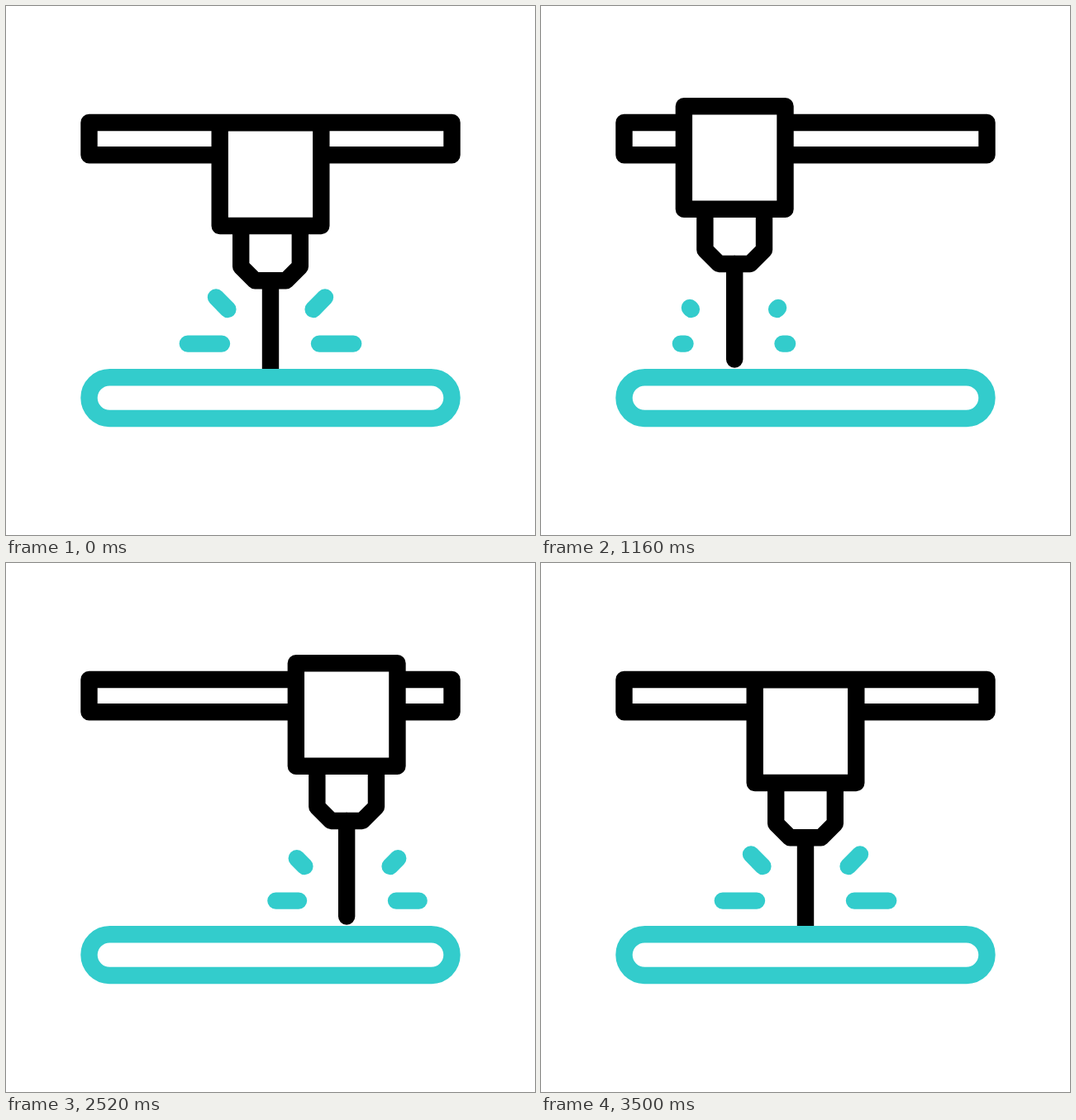
Write an HTML page that moves like this. It is 640 by 640 pixels and loops after 3600 ms.

```html
<!DOCTYPE html>
<html lang="en">
<head>
<meta charset="utf-8">
<title>Drilling machine</title>
<style>
  html, body { margin: 0; width: 100%; height: 100%; overflow: hidden; background: #fff; }
  svg { display: block; width: 100vw; height: 100vh; }
</style>
</head>
<body>
<svg viewBox="0 0 640 640" fill="none" stroke="#000" stroke-width="20.4" stroke-linecap="round" stroke-linejoin="round">
  <rect x="100.5" y="141" width="439" height="39.3"/>
  <g id="head">
    <path d="M0 312V427.5"/>
    <path d="M-35.8 246V295L-18.8 312H18.8L35.8 295V246"/>
    <rect x="-61.3" y="121.2" width="122.6" height="124.6" fill="#fff"/>
  </g>
  <g stroke="#3cc">
    <rect x="100.5" y="449.2" width="439" height="49.8" rx="25" fill="#fff"/>
    <g id="sparks">
      <path id="left"/>
      <path id="right" transform="scale(-1 1)"/>
    </g>
  </g>
</svg>
<script>
const LOOP = 3600, STEP = 20;
const CENTER = 320, WEST = 233.5, EAST = 413, DROP = 20.2;

// Tracks of [time, value]; values ease between neighbouring keys.
const headX = [[0, CENTER], [800, CENTER], [1180, WEST], [1880, WEST], [2547, EAST], [2680, EAST], [3347, CENTER]];
const headY = [[0, DROP], [100, DROP], [500, 0], [3200, 0], [3500, DROP]];
const sparkSize = [
  [0, 1], [100, 1], [360, 0],
  [1100, 0], [1360, 1], [1600, 0], [1640, 0], [1880, 1], [2090, 0],
  [2360, 0], [2620, 1], [2880, 0],
  [3240, 0], [3500, 1]
];

const byId = id => document.getElementById(id);
const mix = (a, b, p) => a + (b - a) * p;
const ease = u => u * u * (3 - 2 * u);

function sample(track, t) {
  const next = track.findIndex(key => key[0] > t);
  if (next < 0) return track[track.length - 1][1];
  const [t0, a] = track[next - 1], [t1, b] = track[next];
  return mix(a, b, ease((t - t0) / (t1 - t0)));
}

function sparkCenter(t) {
  if (t < 800 || t > 3000) return CENTER;
  return t < 2200 ? WEST : EAST;
}

// Each spark keeps its inner end and extends outwards.
function sparkPath(size) {
  return `M-59 408.6H${mix(-59, -100.2, size)}` +
    `M-51.6 367L${mix(-51.6, -66, size)} ${mix(367, 352.4, size)}`;
}

function draw(t) {
  byId("head").setAttribute("transform", `translate(${sample(headX, t)} ${sample(headY, t)})`);
  const size = sample(sparkSize, t);
  const sparks = byId("sparks");
  sparks.setAttribute("visibility", size > 0.001 ? "visible" : "hidden");
  sparks.setAttribute("transform", `translate(${sparkCenter(t)} 0)`);
  for (const side of ["left", "right"]) byId(side).setAttribute("d", sparkPath(size));
}

const start = performance.now();
function tick() {
  const t = (performance.now() - start) % LOOP;
  draw(Math.floor(t / STEP) * STEP);
  requestAnimationFrame(tick);
}
tick();
</script>
</body>
</html>
```
